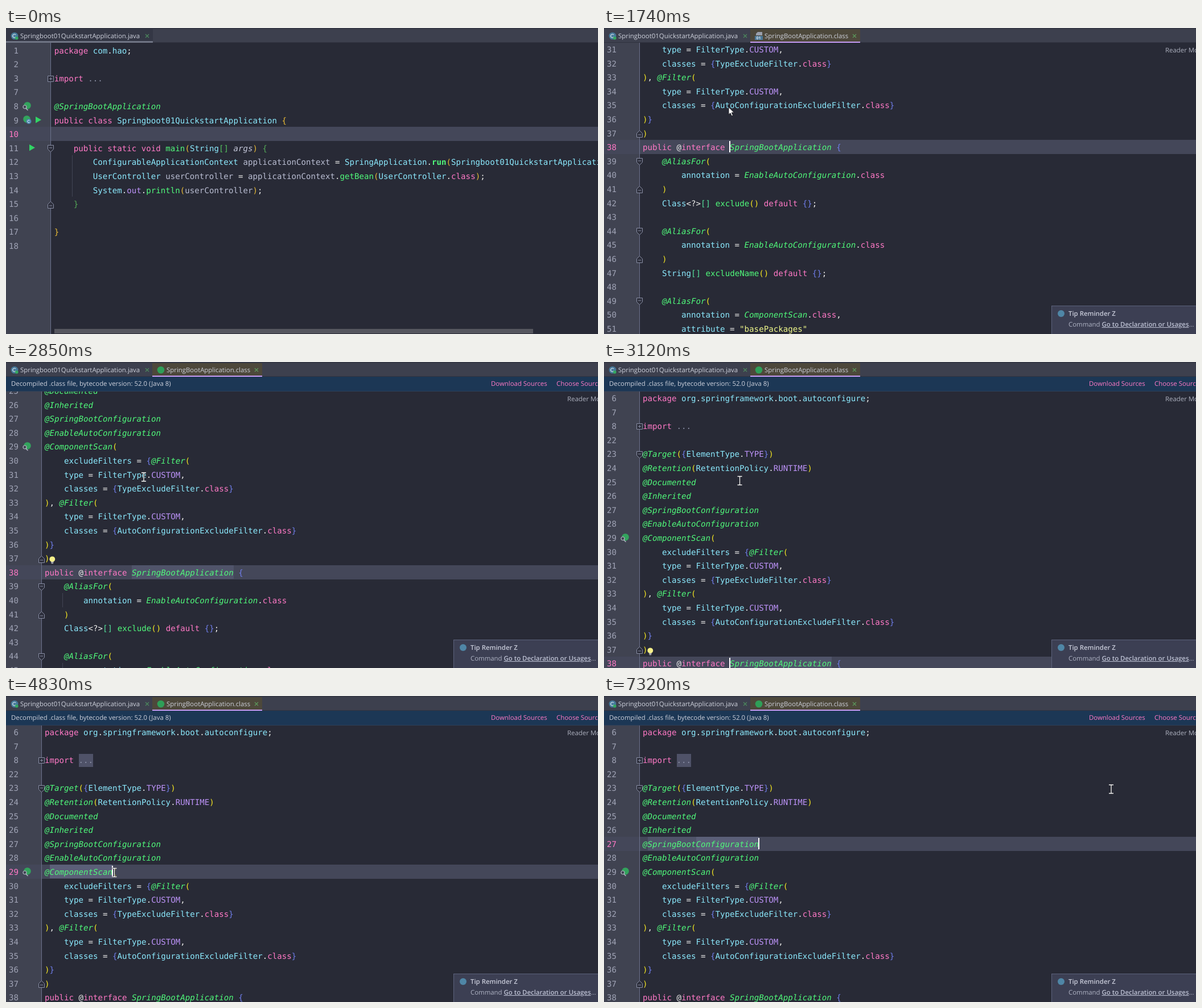
Write an HTML page that moves like this. It is 1040x539 px and loops after 7350 ms.

```html
<!DOCTYPE html>
<html lang="en">
<head>
<meta charset="utf-8">
<title>Editor</title>
<style>
html, body { margin: 0; width: 100%; height: 100%; overflow: hidden; background: #282a36; }
#stage { position: absolute; left: 0; top: 0; width: 1040px; height: 539px; overflow: hidden; background: #282a36;
  font: 11.4px/16px "Open Sans", "Noto Sans", sans-serif; color: #ced1dc; text-rendering: geometricPrecision; }
#stage * { box-sizing: border-box; }
#stage div, #stage svg, .t { position: absolute; white-space: pre; }
svg { overflow: visible; }

.bar { left: 0; top: 0; width: 1040px; height: 26px; background: #3d404e; border-top: 2px solid #343744; border-bottom: 1px solid #30323f; }
.tab { top: 2px; height: 24px; }
.tab .t { left: 25px; top: 5px; }
.tab svg { top: 5px; left: 8px; }
.tab .x { left: auto; right: 6px; top: 8px; }
#tabA { left: 0; width: 258px; }
#tabA.on { background: #343745; border-bottom: 3px solid #6f7484; }
#tabB { left: 257px; width: 193px; background: #4d483b; border-bottom: 2px solid #c79bf5; }

.view { left: 0; top: 26px; width: 1040px; height: 513px; overflow: hidden; }
.gutter { left: 0; top: 0; height: 100%; background: #404351; }
.edge { top: -600px; height: 2000px; width: 1px; background: #6b718c; }
.body { left: 0; top: 0; width: 1040px; height: 539px;
  font: 14.13px/24.6px "DejaVu Sans Mono", "Noto Sans Mono", monospace; }
.hl { left: 0; width: 1040px; height: 24.6px; background: #444759; }
.mark { height: 24px; background: #50546a; }
.sel { background: #5b5f78; }
.guide { width: 1px; background: #414453; }
.row { left: 0; width: 1040px; height: 24.6px; }
.num { left: 0; width: 22px; top: 1.9px; text-align: right; color: #a0a4b6; }
.row.on .num { color: #ff79c6; }
.code { top: 1.9px; color: #f0f0ee; }
.code span { display: inline-block; }
.str { color: #f1fa8c; }
.ann { color: #50fa7b; font-style: italic; }
.kw { color: #ff79c6; }
.run { color: #50fa7b; font-weight: bold; }
.fn { color: #50fa7b; }
.arg { color: #c3c6d8; font-style: italic; }
.var { color: #b9bdd2; }
.con { color: #bd93f9; }
.id { color: #8be9fd; }
.dots { color: #8d92a8; }
.dots.lit { background: linear-gradient(#4f5268, #4f5268) 0 -2px no-repeat; }
.par { color: #f5e622; }
.sq { color: #54e09a; }
.br { color: #6f7de8; }
#viewA .par, #viewA .br { color: #e8ba36; }
#viewA .sq { color: #54c15c; }
#viewA .in .br { color: #54a857; }
.caret { width: 2px; height: 20px; background: #fff; }
.scroll { left: 85px; top: 504px; width: 841px; height: 8px; background: #56575f; }
.reader { left: 986px; top: 6px; color: #adb1bf; }

#banner { left: 0; top: 26px; width: 1040px; height: 26px; background: #1c3755; border-bottom: 1px solid #2c3f58; }
#banner .t { top: 5px; }
#banner .link { color: #ff79c6; }
#note { left: 786px; top: 489px; width: 270px; height: 60px; background: #3c3f53; border: 1px solid #5d627c; }
#note .t { left: 29px; color: #aeb2c3; }
#note b { font-weight: 600; color: #c9ccda; }
#note u { font-weight: 600; color: #bec2d4; }
</style>
</head>
<body>
<div id="stage">
  <div class="bar"></div>
  <div class="tab" id="tabA">
    <svg width="14" height="14"><circle cx="7" cy="7" r="6.3" fill="#477a9b"/><path d="M9 5A3 3 0 1 0 9 9" fill="none" stroke="#dbe6ee" stroke-width="1.2"/><circle cx="10.8" cy="10.8" r="2.8" fill="#35a862"/></svg>
    <span class="t">Springboot01QuickstartApplication.java</span>
    <svg class="x" width="8" height="8"><path d="M1 1L7 7M7 1L1 7" stroke="#4c8a5d" stroke-width="1.2"/></svg>
  </div>
  <div class="tab" id="tabB">
    <svg id="binIcon" width="14" height="14"><path d="M5 0H13V6H2V3Z" fill="#9aa0ac"/><rect y="7" width="14" height="7" fill="#4c7896"/><text x="2.5" y="13" font-size="7" font-weight="700" fill="#dbe6ee">01</text></svg>
    <svg id="annIcon" width="14" height="14"><circle cx="7" cy="7" r="6.3" fill="#2f9f58"/></svg>
    <span class="t">SpringBootApplication.class</span>
    <svg class="x" width="8" height="8"><path d="M1 1L7 7M7 1L1 7" stroke="#5d9a5c" stroke-width="1.2"/></svg>
  </div>
  <div class="view" id="viewA"></div>
  <div class="view" id="viewB"></div>
  <div id="banner">
    <span class="t" style="left:9px">Decompiled .class file, bytecode version: 52.0 (Java 8)</span>
    <span class="t link" style="left:852px">Download Sources</span>
    <span class="t link" style="left:967px">Choose Sources...</span>
  </div>
  <div id="note">
    <svg width="14" height="14" style="left:9px;top:6px"><circle cx="7" cy="7" r="6" fill="#4f86a6"/></svg>
    <span class="t" style="top:6px"><b>Tip Reminder Z</b></span>
    <span class="t" style="top:25px">Command <u>Go to Declaration or Usages</u>...</span>
  </div>
  <svg id="beam" width="9" height="17"><g fill="none"><path d="M.5 1H8.5M4.5 1V16M.5 16H8.5" stroke="#1b1c24" stroke-width="2.6"/><path d="M.5 1H8.5M4.5 1V16M.5 16H8.5" stroke="#fff" stroke-width="1.3"/></g></svg>
  <svg id="arrow" width="12" height="18"><path d="M.5 .5V13.5L3.5 10.8L5.8 16L8 15L5.8 10H10Z" fill="#fff" stroke="#15161c" stroke-width=".9"/></svg>
</div>
<script>
const LOOP = 7350, STEP = 30, PITCH = 24.6, CHAR = 8.51;
const $ = id => document.getElementById(id);

// each row: number | fold mark | gutter icon | code
const javaRows = `1|||package com.hao;
2|||
3|plus||import ...
7|||
8||bean|@SpringBootApplication
9||main|public class Springboot01QuickstartApplication {
10|||
11|down|run|    public static void main(String[] args) {
12|||        ConfigurableApplicationContext applicationContext = SpringApplication.run(Springboot01QuickstartApplication.class, args);
13|||        UserController userController = applicationContext.getBean(UserController.class);
14|||        System.out.println(userController);
15|up||    }
16|||
17|||}
18|||`;
const classRows = `6|||package org.springframework.boot.autoconfigure;
7|||
8|plus||import ...
22|||
23|down||@Target({ElementType.TYPE})
24|||@Retention(RetentionPolicy.RUNTIME)
25|||@Documented
26|||@Inherited
27|||@SpringBootConfiguration
28|||@EnableAutoConfiguration
29||bean|@ComponentScan(
30|||    excludeFilters = {@Filter(
31|||    type = FilterType.CUSTOM,
32|||    classes = {TypeExcludeFilter.class}
33|||), @Filter(
34|||    type = FilterType.CUSTOM,
35|||    classes = {AutoConfigurationExcludeFilter.class}
36|||)}
37|up||)
38|||public @interface SpringBootApplication {
39|down||    @AliasFor(
40|||        annotation = EnableAutoConfiguration.class
41|up||    )
42|||    Class<?>[] exclude() default {};
43|||
44|down||    @AliasFor(
45|||        annotation = EnableAutoConfiguration.class
46|up||    )
47|||    String[] excludeName() default {};
48|||
49|down||    @AliasFor(
50|||        annotation = ComponentScan.class,
51|||        attribute = "basePackages"`;

const syntax = new RegExp([
  '(?<str>"[^"]*")',
  '(?<dots>\\.{3})',
  '(?<ann>@(?!interface)\\w+|\\b(?:EnableAutoConfiguration|ComponentScan|SpringBootApplication)\\b)',
  '(?<kw>\\b(?:package|import|public|class|static|void|interface|default)\\b)',
  '(?<run>\\brun\\b)', '(?<arg>\\bargs\\b)',
  '(?<con>\\b(?:[A-Z]{2,}|out)\\b)',
  '(?<var>\\b(?:applicationContext|userController)\\b)',
  '(?<fn>\\b[a-z]\\w*(?=\\())', '(?<id>\\w+)',
  '(?<par>[()])', '(?<sq>[\\[\\]])', '(?<br>[{}])', '(?<op><)'
].join('|'), 'g');

const paint = code => code.replace(syntax, (m, ...rest) => {
  const groups = rest[rest.length - 1];
  const kind = Object.keys(groups).find(k => groups[k] !== undefined);
  return `<span class="${kind}">${m === '<' ? '&lt;' : m}</span>`;
});

const svg = (x, y, inner) => `<svg width="16" height="16" style="left:${x}px;top:${y}px">${inner}</svg>`;
const foldShape = {
  plus: 'M.5 1.5H10.5V11.5H.5ZM3 6.5H8M5.5 4V9',
  down: 'M.5 .5H10.5V7.5L5.5 12.5L.5 7.5ZM3 5H8',
  up: 'M.5 12.5H10.5V5.5L5.5 .5L.5 5.5ZM3 8H8'
};
const fold = (kind, x) => kind && svg(x - 5, 7.2, `<path d="${foldShape[kind]}" fill="#2d2f3c" stroke="#888da3"/>`);
const play = x => svg(x, 6.5, '<path d="M0 0L10 5.7L0 11.4Z" fill="#32d465"/>');
const icons = {
  bean: svg(29, 4.5, '<circle cx="8.5" cy="6.5" r="6.3" fill="#33a35d"/><circle cx="4" cy="9" r="3" fill="#404351" stroke="#b3b7c4" stroke-width="1.2"/><path d="M6 11.5L9.5 15" stroke="#b3b7c4" stroke-width="1.5"/>'),
  main: svg(29, 4.5, '<circle cx="7.5" cy="6.5" r="6.3" fill="#33a35d"/><circle cx="11" cy="10.5" r="4.5" fill="#4d86ad"/><path d="M12.6 9A2.2 2.2 0 1 0 12.6 12" fill="none" stroke="#e3edf3"/>') + play(52),
  run: play(41)
};

function build(id, text, gutter, left) {
  const rows = text.split('\n').map((line, i) => {
    const [num, mark, icon, code] = line.split('|');
    return `<div class="row" data-n="${num}" style="top:${i * PITCH}px"><div class="num">${num}</div>` +
      (fold(mark, gutter) || '') + (icons[icon] || '') +
      `<div class="code${code[0] === ' ' ? ' in' : ''}" style="left:${left}px">${paint(code)}</div></div>`;
  }).join('');
  const view = $(id);
  view.innerHTML = `<div class="gutter" style="width:${gutter}px"></div><div class="body"><div class="hl"></div>` +
    `<div class="mark use"></div><div class="mark sel"></div><div class="edge" style="left:${gutter}px"></div>${rows}<div class="caret"></div></div>`;
  const q = s => view.querySelector(s);
  const list = [...view.querySelectorAll('.row')];
  const at = n => list.findIndex(r => r.dataset.n == n);
  const self = {
    view, body: q('.body'), dots: q('.dots'),
    active(n) {
      list.forEach(r => r.classList.toggle('on', r.dataset.n == n));
      q('.hl').style.top = at(n) * PITCH + 'px';
    },
    span(cls, n, from, to) {
      const s = q(cls).style;
      show(q(cls), to > from);
      s.left = left + from * CHAR + 'px';
      s.width = (to - from) * CHAR + 'px';
      s.top = at(n) * PITCH + 'px';
    },
    caret(n, col, on) {
      const c = q('.caret');
      show(c, on);
      c.style.left = left + col * CHAR - 1 + 'px';
      c.style.top = at(n) * PITCH + 2 + 'px';
    },
    guide(from, to, x) {
      const g = document.createElement('div');
      g.className = 'guide';
      g.style.cssText = `left:${x}px;top:${at(from) * PITCH}px;height:${(to - from + 1) * PITCH}px`;
      self.body.insertBefore(g, q('.row'));
      return g;
    },
    bulb(n) {
      const b = document.createElement('div');
      b.style.cssText = `left:76px;top:${at(n) * PITCH + 9}px`;
      b.innerHTML = svg(0, 0, '<circle cx="5.3" cy="5.3" r="4.9" fill="#f7f08a"/><path d="M3 10.5H7.6M3.5 12.5H7.1" stroke="#b9bac0" stroke-width="1.3"/>');
      self.body.append(b);
      return b;
    }
  };
  return self;
}

const show = (el, on) => { el.style.display = on ? '' : 'none'; };
const within = (t, a, b) => t >= a && t < b;

const A = build('viewA', javaRows, 78, 84.7);
const B = build('viewB', classRows, 62, 68);
A.guide(12, 14, 116);
const guides = [40, 45, 50].map(n => B.guide(n, n, 99));
const bulbs = [B.bulb(37), B.bulb(28)];
A.view.insertAdjacentHTML('beforeend', '<div class="scroll"></div>');
B.view.insertAdjacentHTML('beforeend', '<div class="reader">Reader Mode</div>');
A.body.style.top = '.8px';
A.span('.use', 8, 0, 0);
A.span('.sel', 8, 0, 0);

// time, x, y of the pointer
const path = [
  [0, 1060, 52], [90, 1060, 52], [180, 1000, 62], [450, 590, 140], [660, 310, 197], [840, 225, 142], [900, 220.5, 140.5],
  [2160, 220.5, 146], [2340, 232, 172], [2580, 244, 204], [2790, 243, 203], [2850, 242, 202.5], [3120, 238.5, 209],
  [3210, 238, 214], [3510, 186, 302], [3750, 104, 308], [4020, 80, 310], [4260, 80, 310], [4800, 190.5, 311],
  [5190, 190.5, 311], [5880, 164.5, 266.5], [6210, 164.5, 266.5], [6720, 286.5, 263], [7020, 286.5, 263],
  [7170, 560, 214], [7320, 891, 164], [7350, 891, 164]
];
// time, first visible row
const rolling = [[0, 12], [2760, 12], [2850, 6.525], [2940, 2.4], [3060, 0], [7350, 0]];

function sample(keys, t, k) {
  let i = 0;
  while (i < keys.length - 2 && t >= keys[i + 1][0]) i++;
  const slope = j => {
    const p = keys[j - 1], c = keys[j], n = keys[j + 1];
    if (!p || !n || (c[k] - p[k]) * (n[k] - c[k]) <= 0) return 0;
    return (n[k] - p[k]) / (n[0] - p[0]);
  };
  const [a, b] = [keys[i], keys[i + 1]], d = b[0] - a[0], u = (t - a[0]) / d, v = 1 - u;
  return v * v * (1 + 2 * u) * a[k] + u * u * (3 - 2 * u) * b[k] + d * u * v * (v * slope(i) - u * slope(i + 1));
}

function render(t) {
  const x = sample(path, t, 1), y = sample(path, t, 2);
  const inB = t >= 1680, ready = t >= 1950, loading = within(t, 1680, 1950);
  show(A.view, !inB);
  show(B.view, inB);
  show($('tabB'), inB);
  $('tabA').classList.toggle('on', !inB);
  show($('binIcon'), loading);
  show($('annIcon'), ready);
  show($('banner'), ready);
  show($('note'), t >= 1710);

  A.active(t < 870 ? 10 : 8);
  A.caret(8, 16, within(t, 870, 1200));

  B.view.style.top = (ready ? 52 : 26) + 'px';
  B.body.style.top = -.9 - sample(rolling, t, 1) * PITCH + 'px';
  const line = t < 4230 ? 38 : t < 6060 ? 29 : 27;
  B.active(line);
  B.dots.classList.toggle('lit', t >= 4500);
  guides.forEach(g => show(g, ready));
  show(bulbs[0], within(t, 2400, 4230));
  show(bulbs[1], within(t, 5400, 6060));

  const col = Math.round((x - 68) / CHAR);
  if (line === 38) {
    B.span('.sel', 38, 0, 0);
    B.caret(38, 18, !within(t, 2550, 3050) && !within(t, 3540, 4020));
  } else if (line === 29) {
    const end = t < 4800 ? Math.min(14, Math.max(1, col)) : 14;
    B.span('.sel', 29, 1, end);
    B.caret(29, end, !within(t, 5310, 5820));
  } else {
    const end = t < 6750 ? Math.min(24, Math.max(11, col)) : 24;
    B.span('.sel', 27, 11, end);
    B.caret(27, end, true);
  }
  if (t < 4500) B.span('.use', 38, 18, ready ? 39 : 18);
  else B.span('.use', 27, 1, t < 6060 ? 1 : 24);

  show($('beam'), !loading);
  show($('arrow'), loading);
  $('beam').style.transform = `translate(${x - 4.5}px, ${y - 8.5}px)`;
  $('arrow').style.transform = `translate(${x - 2}px, ${y - 1.5}px)`;
}

const start = performance.now();
function tick() {
  const t = (performance.now() - start) % LOOP;
  render(Math.floor(t / STEP) * STEP);
  requestAnimationFrame(tick);
}
tick();
</script>
</body>
</html>
```
